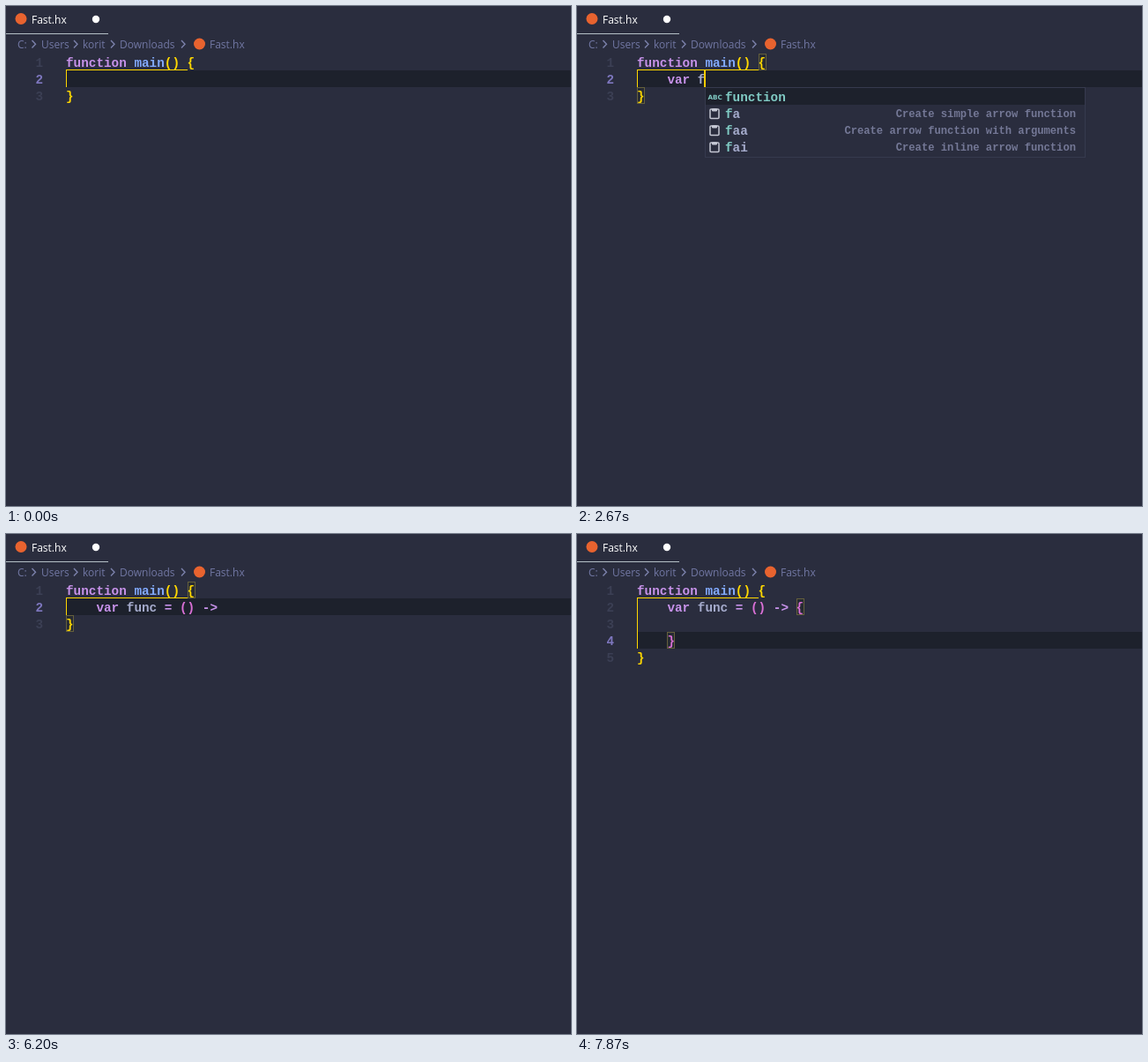
These frames come from a looping animation (641x567 px, 8 s). An HTML page:

```html
<!DOCTYPE html>
<html lang="en">
<head>
<meta charset="utf-8">
<title>Code editor</title>
<style>
  html, body { margin: 0; width: 100%; height: 100%; overflow: hidden; background: #2a2d3e; }
  svg { display: block; }
  text { white-space: pre; }
  .ui { font: 12px "Open Sans", "Noto Sans", sans-serif; fill: #7177a3; }
  .code { font: bold 14.333px "Liberation Mono", monospace; }
  .info { font: bold 12.17px "Liberation Mono", monospace; fill: #747896; text-anchor: end; }
</style>
</head>
<body>
<svg width="641" height="567" viewBox="0 0 641 567">
  <g class="ui">
    <circle cx="17" cy="14.5" r="6.5" fill="#e8632f"/>
    <text x="29" y="20" fill="#fff" style="fill:#fff">Fast.hx</text>
    <circle cx="102" cy="15" r="4.2" fill="#fff"/>
    <rect y="31" width="116" height="1" fill="#b4c0c6"/>
    <text x="13" y="48">C:</text>
    <text x="40" y="48">Users</text>
    <text x="87" y="48">korit</text>
    <text x="129" y="48">Downloads</text>
    <circle cx="219.5" cy="43" r="6.5" fill="#e8632f"/>
    <text x="231" y="48">Fast.hx</text>
    <path d="M29.5 39l4 4.2-4 4.2M77 39l4 4.2-4 4.2M119 39l4 4.2-4 4.2M199 39l4 4.2-4 4.2"
      fill="none" stroke="#7b81ab" stroke-width="1.4"/>
  </g>
  <g id="editor"></g>
  <g id="mouse"></g>
</svg>
<script>
const LOOP = 8000, LEFT = 68, TOP = 54, ROW = 19, CHAR = 8.6;
const GOLD = '#ffd700', PINK = '#da70d6', KEY = '#c792ea', NAME = '#82aaff',
      PLAIN = '#a6accd', TEAL = '#80cbc4', DARK = '#1d212c';

// start, second line, caret row, caret column, caret shown, marked pair, active guide
const STATES = [
  [0,    '', 2, 4, 0, '', 'outer'],
  [800,  '', 2, 4, 1, 'main', 'outer'],
  [1270, '', 2, 4, 0, 'main', 'outer'],
  [1800, 'v', 2, 5, 1, 'main', 'outer'],
  [2000, 'va', 2, 6, 1, 'main', 'outer'],
  [2270, 'var', 2, 7, 1, 'main', 'outer'],
  [2470, 'var', 2, 8, 1, 'main', 'outer'],
  [2670, 'var f', 2, 9, 1, 'main', 'outer'],
  [2730, 'var fu', 2, 10, 1, 'main', 'outer'],
  [2930, 'var fun', 2, 11, 1, 'main', 'outer'],
  [3070, 'var func', 2, 12, 1, 'main', 'outer'],
  [3270, 'var func', 2, 13, 1, 'main', 'outer'],
  [3730, 'var func', 2, 13, 0, 'main', 'outer'],
  [3800, 'var func =', 2, 14, 1, 'main', 'outer'],
  [3930, 'var func =', 2, 15, 1, 'main', 'outer'],
  [4400, 'var func = ()', 2, 16, 1, 'paren', ''],
  [4530, 'var func = ()', 2, 17, 1, 'paren', ''],
  [4600, 'var func = ()', 2, 18, 1, 'main', 'outer'],
  [5070, 'var func = ()', 2, 18, 0, 'main', 'outer'],
  [5130, 'var func = () -', 2, 19, 1, 'main', 'outer'],
  [5470, 'var func = () ->', 2, 20, 1, 'main', 'outer'],
  [5730, 'var func = () ->', 2, 21, 1, 'main', 'outer'],
  [6200, 'var func = () ->', 2, 21, 0, 'main', 'outer'],
  [6270, 'var func = () -> {}', 2, 22, 1, 'main', 'outer'],
  [6330, 'var func = () -> {}', 2, 22, 1, 'brace', 'outer'],
  [6800, 'var func = () -> {}', 2, 22, 0, 'brace', ''],
  [7070, 'var func = () -> {', 3, 8, 1, 'block', 'inner'],
  [7400, 'var func = () -> {', 4, 5, 1, 'block', 'outer'],
  [7870, 'var func = () -> {', 4, 5, 0, 'block', 'outer']
];

const xAt = col => LEFT + col * CHAR;
const yAt = row => TOP + (row - 1) * ROW;
const rect = (x, y, w, h, fill, more = '') =>
  `<rect x="${x}" y="${y}" width="${w}" height="${h}" fill="${fill}" ${more}/>`;
const label = (x, y, text, fill) =>
  `<text class="code" x="${x}" y="${y}" fill="${fill}">${text.replace('>', '&gt;')}</text>`;
const token = (row, col, text, fill) => label(xAt(col), yAt(row) + 15, text, fill);
const box = (row, col) =>
  rect(Math.round(xAt(col)) + .5, yAt(row) + .5, 8, 18, '#262a33', 'stroke="#65603c"');

function colorOf(word) {
  if (/[(){}]/.test(word)) return PINK;
  return word === 'var' || /[=-]/.test(word) ? KEY : PLAIN;
}

function line(row, col, text) {
  return [...text.matchAll(/\w+|->|[=-]|[(){}]/g)]
    .map(m => token(row, col + m.index, m[0], colorOf(m[0]))).join('');
}

function clipboard(x, y) {
  return `<g transform="translate(${x} ${y})" fill="none" stroke="#c5c8d4" stroke-width="1.5">
    <rect x="1" y="2" width="10" height="10.5" rx="1"/>
    <path d="M3.5 4V1.8h1.7a1 1 0 0 1 1.6 0h1.7V4z" fill="#c5c8d4" stroke-width="1"/></g>`;
}

function popup(x, typed) {
  const items = typed.length > 1 ? [] : [
    ['a', 'Create simple arrow function'],
    ['aa', 'Create arrow function with arguments'],
    ['ai', 'Create inline arrow function']
  ];
  let out = rect(x + .5, 92.5, 431, 3 + ROW * (items.length + 1), '#2a2d3e', 'stroke="#363a4e"') +
    rect(x + 1, 93, 430, ROW, DARK) +
    `<text x="${x + 3.5}" y="105.5" fill="${TEAL}" style="font:bold 7.2px 'DejaVu Sans',sans-serif">ABC</text>` +
    label(x + 23, 108, 'function', TEAL);
  items.forEach(([rest, info], i) => {
    const y = 127 + i * ROW;
    out += clipboard(x + 5, y - 12) + label(x + 23, y, 'f', TEAL) +
      label(x + 23 + CHAR, y, rest, PLAIN) +
      `<text class="info" x="${x + 421}" y="${y - 1}">${info}</text>`;
  });
  return out;
}

function guides(guide, last) {
  const height = (last - 2) * ROW;
  if (guide === 'outer')
    return rect(LEFT, 72, 138, 1, GOLD) + rect(LEFT, 72, 1, height + 1, GOLD);
  let out = rect(LEFT, 73, 1, height, '#4a4b66');
  if (guide === 'inner') out += rect(102, 91, 147, 1, PINK) + rect(102, 91, 1, 20, PINK);
  return out;
}

function draw([at, text, row, col, shown, pair, guide]) {
  const last = row > 2 ? 5 : 3;
  const pairs = {
    main: [[1, 16], [last, 0]],
    paren: [[2, 15], [2, 16]],
    brace: [[2, 21], [2, 22]],
    block: [[2, 21], [4, 4]]
  };
  let out = rect(LEFT, yAt(row), 641 - LEFT, ROW, DARK);
  out += (pairs[pair] || []).map(p => box(...p)).join('');
  out += guides(guide, last);
  for (let n = 1; n <= last; n++)
    out += label(33.5, yAt(n) + 15, String(n), n === row ? '#7d76bd' : '#3b3f54');
  out += token(1, 0, 'function', KEY) + token(1, 9, 'main', NAME) +
    token(1, 13, '()', GOLD) + token(1, 16, '{', GOLD) +
    line(2, 4, text) + (last === 5 ? line(4, 4, '}') : '') + token(last, 0, '}', GOLD);
  const typed = /^var (f\w*)$/.exec(text);
  if (typed && col === 8 + typed[1].length) out += popup(Math.floor(xAt(col)), typed[1]);
  if (shown) out += rect(Math.round(xAt(col)) - 1, yAt(row), 2, ROW, '#ffcc00');
  return out;
}

function pointer(t) {
  if (t < 130 || t >= 1000) return '';
  const k = Math.min(1, Math.floor((t - 130) / 66.6) / 8);
  const e = k * k * (3 - 2 * k);
  let x = 63 + 49.5 * e, y = 5 + 79.5 * e;
  if (t >= 930) { x = 167.5; y = 94.5; }
  x = Math.floor(x) + .5;
  y = Math.floor(y) + .5;
  if (y < TOP)
    return `<path transform="translate(${x} ${y})" d="M0 0V15.5L3.6 12.2 6 17.5 8.3 16.5 6 11.4H11Z"
      fill="#fff" stroke="#000" stroke-width=".8"/>`;
  const beam = `M${x - 3} ${y - 7}h2.3l.7.7.7-.7h2.3M${x} ${y - 6.5}v13M${x - 3} ${y + 7}h2.3l.7-.7.7.7h2.3`;
  return `<path d="${beam}" fill="none" stroke="#11131a" stroke-width="2.4"/>
    <path d="${beam}" fill="none" stroke="#f4f4f4" stroke-width="1"/>`;
}

const editor = document.getElementById('editor');
const mouse = document.getElementById('mouse');
const start = performance.now();
let current = null, lastMouse = null;

function tick() {
  const t = (performance.now() - start) % LOOP;
  const state = STATES.findLast(s => s[0] <= t);
  if (state !== current) editor.innerHTML = draw(current = state);
  const shape = pointer(t);
  if (shape !== lastMouse) mouse.innerHTML = lastMouse = shape;
  requestAnimationFrame(tick);
}
tick();
</script>
</body>
</html>
```
